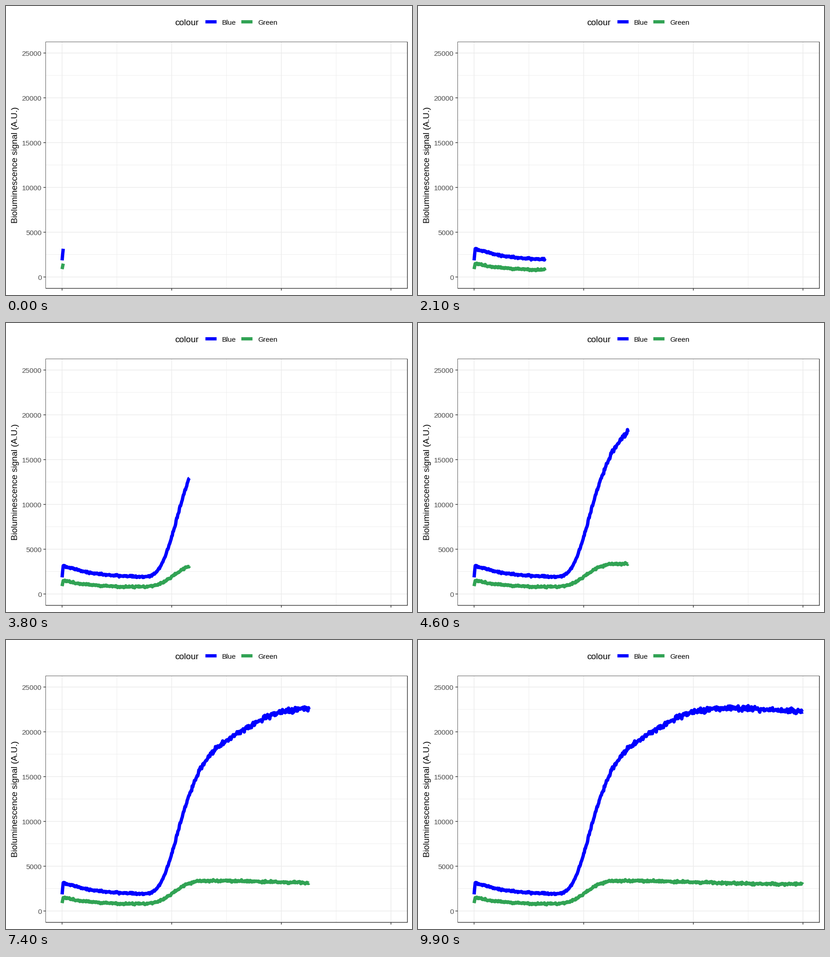
These frames come from a looping animation (885 by 632 pixels, 10000 ms). A matplotlib script:

```python
import numpy as np
import matplotlib.pyplot as plt
from matplotlib.animation import FuncAnimation

plt.rcParams["font.family"] = "Liberation Sans"
plt.rcParams["path.simplify"] = False

W, H, DPI = 885, 632, 100
LEFT, RIGHT, TOP, BOTTOM = 86.5, 875.0, 78.5, 617.5
X0, X1 = 122.3, 839.2          # first and last sample
Y0, Y_STEP = 592.6, 97.96      # zero line, pixels per 5000 units
FRAMES, SAMPLES, FIRST, PER_FRAME = 100, 595, 3, 6
BLUE, GREEN = "#0000ff", "#31a354"
GRID, DARK, LABEL = "#ebebeb", "#333333", "#4d4d4d"

fig = plt.figure(figsize=(W / DPI, H / DPI), dpi=DPI, facecolor="white")
ax = fig.add_axes([0, 0, 1, 1])
ax.set_xlim(0, W)
ax.set_ylim(H, 0)
ax.axis("off")


def stroke(xs, ys, color, px, z=1, join="miter"):
    line, = ax.plot(xs, ys, color=color, lw=px * 72 / DPI, zorder=z,
                    solid_capstyle="butt", solid_joinstyle=join)
    line.set_snap(False)
    return line


def label(x, y, text, px, color="black", **kw):
    ax.text(x, y, text, fontsize=px * 72 / DPI, color=color,
            va="baseline", **kw)


def draw_panel():
    gap = (X1 - X0) / 3
    for k in range(3):
        stroke([X0 + (k + .5) * gap] * 2, [TOP, BOTTOM], GRID, 0.8)
    for k in range(5):
        stroke([LEFT, RIGHT], [Y0 - (k + .5) * Y_STEP] * 2, GRID, 0.8)
    for k in range(4):
        x = X0 + k * gap
        stroke([x, x], [TOP, BOTTOM], GRID, 1.42)
        stroke([x, x], [BOTTOM, BOTTOM + 4.7], DARK, 1.42)
    for k in range(6):
        y = Y0 - k * Y_STEP
        stroke([LEFT, RIGHT], [y, y], GRID, 1.42)
        stroke([LEFT - 4.9, LEFT], [y, y], DARK, 1.42)
        label(77.6, y + 6.2, str(5000 * k), 15.4, LABEL, ha="right")
    # the border is lighter on its left and top sides
    stroke([LEFT, LEFT, RIGHT], [BOTTOM, TOP, TOP], DARK, 0.8, z=4)
    stroke([LEFT, RIGHT, RIGHT], [BOTTOM, BOTTOM, TOP], DARK, 1.42, z=4)
    label(25, 348, "Bioluminescence signal (A.U.)", 19.1, rotation=90,
          rotation_mode="anchor", ha="center")


def draw_legend():
    label(368.5, 42, "colour", 19.1)
    for x, name, color in ((434.7, "Blue", BLUE), (513, "Green", GREEN)):
        stroke([x, x + 24.3], [34.6, 34.6], color, 7.1)
        label(x + 36.2, 41, name, 15.2)


def logistic(size, mid, width):
    return size / (1 + np.exp(-(x - mid) / width))


def gompertz(size, mid, width):
    return size * np.exp(-np.exp(-(x - mid) / width))


def noisy(height):
    """Signal height to pixel rows: quick start, noise growing with signal."""
    height[:2] *= 0.58, 0.8
    jitter = np.clip(rng.normal(0, 1, SAMPLES), -2.2, 2.2)
    jitter[:FIRST] = 0
    return Y0 - height + jitter * (0.95 + 0.0048 * height)


rng = np.random.default_rng(7)
x = np.linspace(X0, X1, SAMPLES)
decay = np.exp(-(x - 128) / 70)
blue = noisy(35 + 25.5 * decay + gompertz(345, 372, 36)
             + logistic(64, 539, 33) - logistic(7, 745, 18))
green = noisy(13.5 + 15 * decay + logistic(54.5, 366, 18)
              - logistic(10, 600, 80))

draw_panel()
draw_legend()
curves = [(stroke([], [], BLUE, 7.3, 3, "round"), blue),
          (stroke([], [], GREEN, 7.3, 3, "round"), green)]


def update(frame):
    n = FIRST + PER_FRAME * frame
    for line, y in curves:
        line.set_data(x[:n], y[:n])
    return [line for line, _ in curves]


anim = FuncAnimation(fig, update, frames=FRAMES, interval=100,
                     init_func=lambda: update(0), repeat=True, repeat_delay=0)
plt.show()
```
